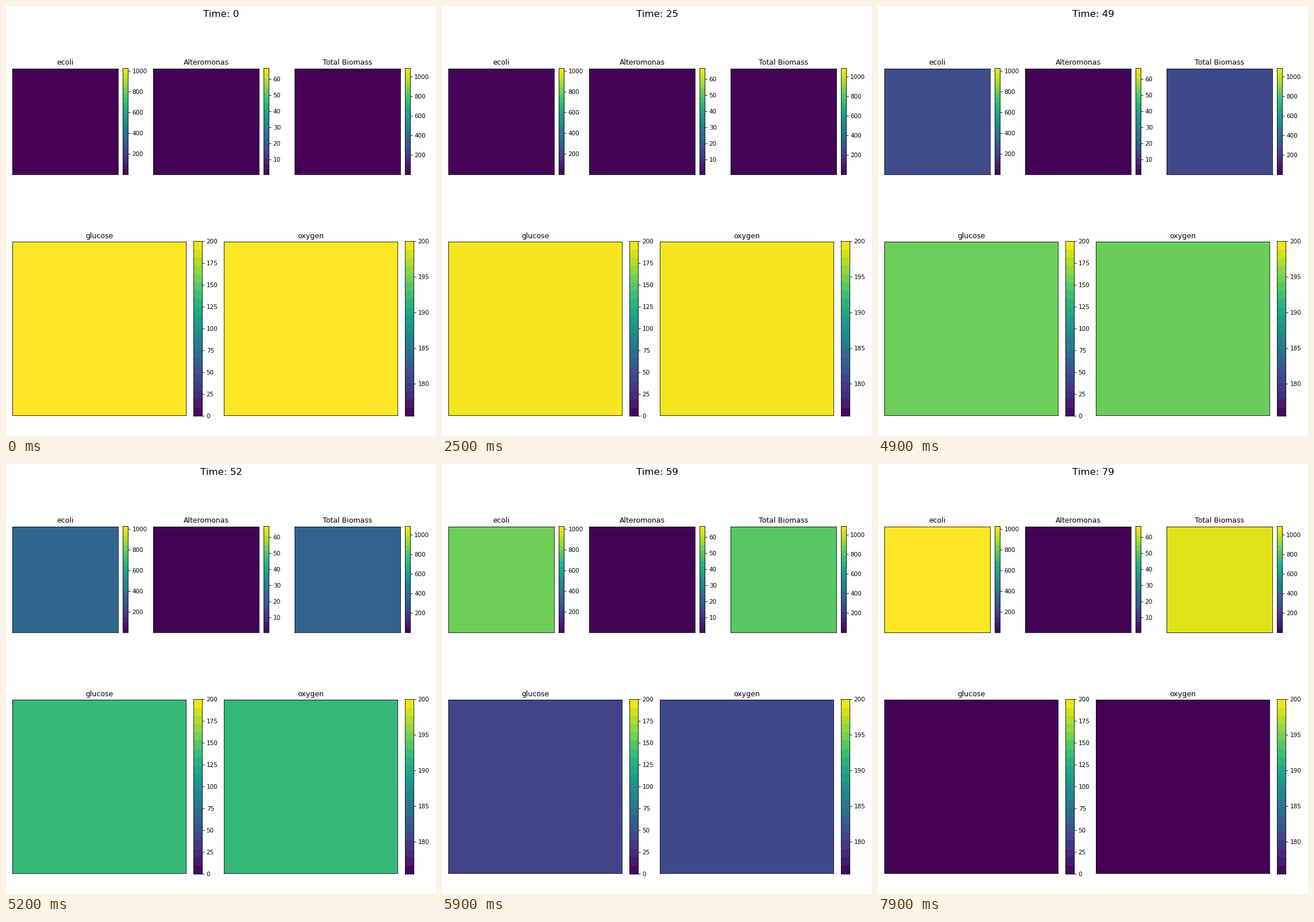
Animation, 748 px wide and 748 px high, one loop 8000 ms. Source, as a matplotlib script:

```python
import numpy as np
import matplotlib.pyplot as plt
from matplotlib.animation import FuncAnimation

SIZE = 748
FRAMES, INTERVAL = 80, 100
MARGIN = 11.1
BANDS = 21
CMAP = plt.get_cmap("viridis")

plt.rcParams["font.family"] = "DejaVu Sans"
fig = plt.figure(figsize=(10, 10), dpi=SIZE / 10, facecolor="white")


def pixel_axes(x, y, w, h):
    """Axes placed in pixels, measured from the top left."""
    return fig.add_axes([x / SIZE, 1 - (y + h) / SIZE, w / SIZE, h / SIZE])


def add_bar(x, y, w, h, lo, hi, step):
    ax = pixel_axes(x, y, w, h)
    shades = (np.arange(BANDS) + 0.5)[:, None] / BANDS
    ax.imshow(shades, cmap=CMAP, vmin=0, vmax=1, origin="lower", aspect="auto",
              interpolation="nearest", extent=(0, 1, lo, hi))
    ax.set_xticks([])
    ax.yaxis.tick_right()
    ax.set_yticks(np.arange(np.ceil(lo / step) * step, hi + 0.01, step))
    ax.tick_params(labelsize=10)


def add_panel(x, y, side, title, lo, hi, step):
    """A square panel with its colour bar on the right."""
    ax = pixel_axes(x, y, side, side)
    ax.set(xticks=[], yticks=[])
    ax.set_title(title, fontsize=12)
    grow = 0.0033 * side
    add_bar(x + 1.0436 * side, y - grow, 0.05 * side, side + 2 * grow, lo, hi, step)
    return ax, lo, hi


def add_row(y, side, pitch, specs):
    return [add_panel(MARGIN + i * pitch, y, side, *spec)
            for i, spec in enumerate(specs)]


# title, low, high, tick step
BIOMASS = [("ecoli", 1, 1025, 200),
           ("Alteromonas", 0.5, 66.6, 10),
           ("Total Biomass", 1, 1090, 200)]
MEDIA = [("glucose", 0, 200, 25),
         ("oxygen", 175.42, 200, 5)]

panels = add_row(108.7, 183.8, 245.3, BIOMASS) + add_row(410.4, 302, 368, MEDIA)
clock = fig.suptitle("Time: 0", fontsize=16, y=0.991)


def state(t):
    """Exponential growth until the food runs out, then a slow drift."""
    ecoli = min(800.5 * np.exp(0.1225 * (t - 59)), 1022 + 0.7 * (t - 61))
    altero = 1.0
    eaten = min(ecoli / 1022, 1)
    glucose = 200 * (1 - eaten * (0.965 + 0.07 * eaten))
    oxygen = 200 - 24.58 * eaten
    return ecoli, altero, ecoli + altero, glucose, oxygen


def update(t):
    clock.set_text(f"Time: {t}")
    for (ax, lo, hi), value in zip(panels, state(t)):
        ax.set_facecolor(CMAP(float(np.clip((value - lo) / (hi - lo), 0, 1))))
    return [clock] + [ax for ax, _, _ in panels]


anim = FuncAnimation(fig, update, frames=FRAMES, interval=INTERVAL,
                     repeat=True, repeat_delay=0, blit=False)
plt.show()
```
